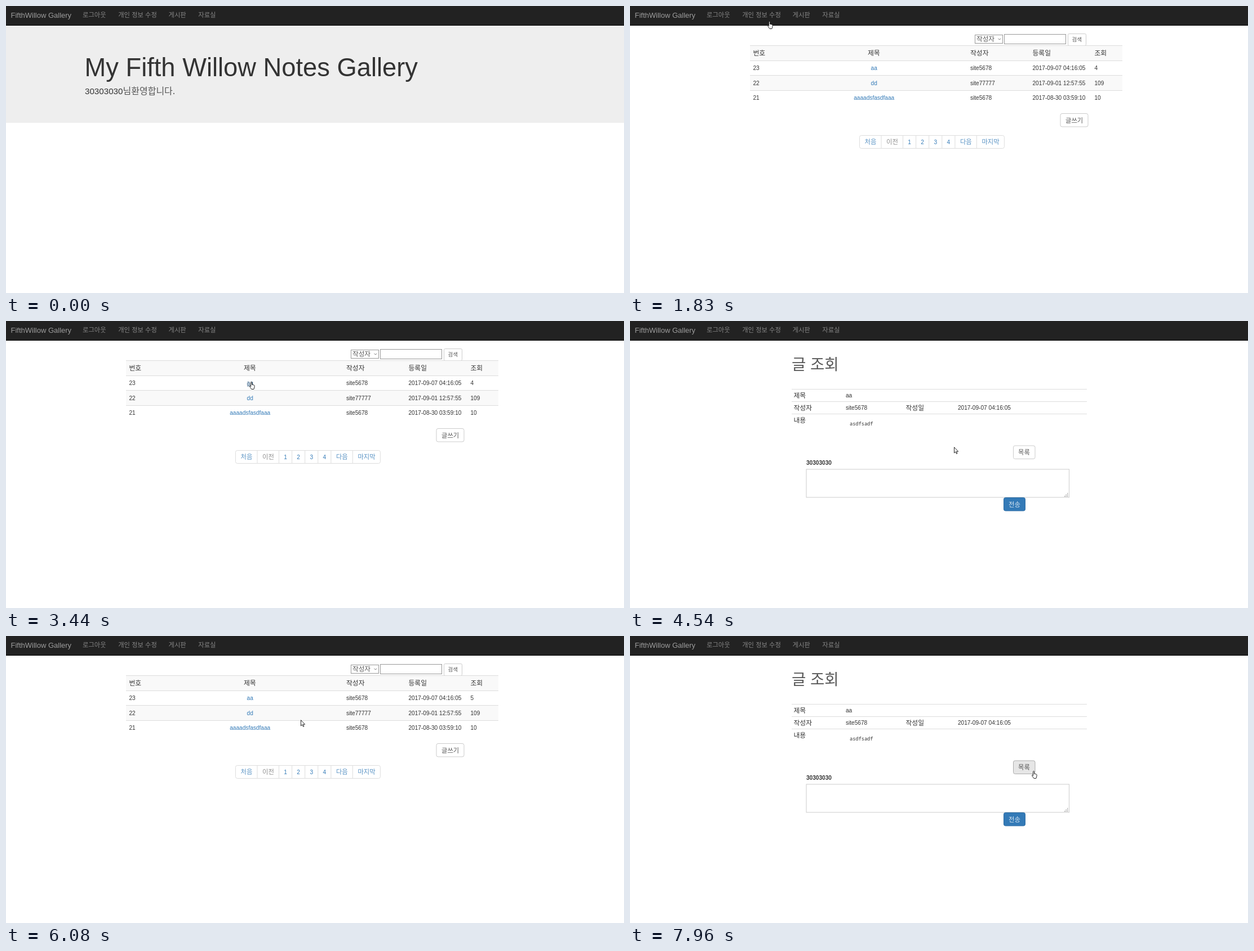
These frames come from a looping animation (1097x511 px, 8 s). An HTML page:

```html
<!DOCTYPE html>
<html lang="ko">
<head>
<meta charset="utf-8">
<style>
html, body { margin: 0; width: 100%; height: 100%; overflow: hidden; background: #fff; }
svg { display: block; width: 100%; height: 100%; }
text { font-family: "Liberation Sans", Arial, sans-serif; white-space: pre; }
.ko { font-family: "Noto Sans CJK KR", "Noto Sans CJK", sans-serif; font-weight: 300; fill-opacity: .82; }
.th { font-weight: 400; fill-opacity: 1; }
.mono { font-family: "Noto Sans Mono", monospace; }
.bold { font-weight: 700; }
</style>
</head>
<body>
<svg id="stage" viewBox="0 0 1097 511"></svg>
<script>
const LOOP = 8000, STEP = 77, LINK = '#337ab7', INK = '#333';
const BODY = 10.12, KO = 11.3, HEAD = 11.8;
const stage = document.getElementById('stage');
const $ = id => document.getElementById(id);

// y is the vertical middle of the glyphs
const text = (x, y, s, size = BODY, fill = INK, cls = '', extra = '') =>
  `<text x="${x}" y="${(y + size * .365).toFixed(2)}" font-size="${size}" fill="${fill}" class="${cls}" ${extra}>${s}</text>`;
const mid = (x, y, s, fill) => text(x, y, s, BODY, fill, '', 'text-anchor="middle"');
const ko = (x, y, s, size = KO, fill = INK, cls = '') => text(x, y, s, size, fill, 'ko ' + cls);
const head = (x, y, s) => ko(x, y, s, HEAD, INK, 'th');
const rect = (x, y, w, h, fill, stroke = 'none', r = 0, extra = '') =>
  `<rect x="${x}" y="${y}" width="${w}" height="${h}" fill="${fill}" stroke="${stroke}" rx="${r}" ${extra}/>`;
const line = (x1, y1, x2, y2) => `<path d="M${x1} ${y1}L${x2} ${y2}" stroke="#ddd"/>`;
const group = (id, body) => `<g id="${id}">${body}</g>`;

function navBar() {
  const items = { out: '로그아웃', info: '개인 정보 수정', list: '게시판', files: '자료실' };
  let x = 136, out = rect(0, 0, 1097, 35, '#222') + rect(0, 34, 1097, 1, '#080808') +
    text(8.5, 16, 'FifthWillow Gallery', 13, '#9d9d9d');
  for (const [id, s] of Object.entries(items)) {
    out += group(id, ko(x, 16, s, KO, 'currentColor'));
    const spaces = s.split(' ').length - 1;
    x += (s.length - spaces) * 10.45 + spaces * 2.6 + 21.4;
  }
  return out;
}

function homePage() {
  return rect(0, 35, 1097, 173, '#eee') +
    text(139.5, 108.5, 'My Fifth Willow Notes Gallery', 45.3) +
    text(140, 151, '30303030', 15.17) + ko(207.5, 151, '님환영합니다.', 16);
}

function pager() {
  const y = 230.5, h = 23;
  let x = 407.5, out = '';
  for (const s of ['처음', '이전', '1', '2', '3', '4', '다음', '마지막']) {
    const isNum = s < 'A', w = isNum ? 23.1 : 17.5 + s.length * 10.5;
    const fill = s === '이전' ? '#777' : LINK;
    if (out) out += line(x, y, x, y + h);
    out += isNum ? mid(x + w / 2, 242, s, fill) : ko(x + 9, 242, s, KO, fill);
    x += w;
  }
  return rect(407.5, y, x - 407.5, h, '#fff', '#ddd', 3) + out;
}

function boardPage() {
  const cols = [[218.5, '번호'], [422, '제목'], [604, '작성자'], [714.5, '등록일'], [824.5, '조회']];
  const rows = [
    ['23', 'aa', 'site5678', '2017-09-07 04:16:05', '4'],
    ['22', 'dd', 'site77777', '2017-09-01 12:57:55', '109'],
    ['21', 'aaaadsfasdfaaa', 'site5678', '2017-08-30 03:59:10', '10']
  ];
  let out = rect(612.5, 51.5, 49, 15, '#fff', '#999') + ko(615, 59, '작성자', 11.6) +
    '<path d="M653.5 57.8l2.3 2.3 2.3-2.3" fill="none" stroke="#777"/>' +
    rect(664.5, 50.5, 109, 17, '#fff', '#999') +
    rect(777.5, 49.5, 32, 21, '#fff', '#ccc', 2) + ko(784.5, 59.5, '검색', 9.5);
  for (let i = 0; i < 4; i++) {
    const y = Math.floor(70.6 + i * 26.5) + .5;
    if (i % 2 === 0) out += rect(213, y, 661, 26.5, '#f9f9f9');
    out += line(213, y, 874, y);
  }
  out += cols.map(([x, s]) => head(x, 84, s)).join('');
  rows.forEach((row, r) => row.forEach((s, c) => {
    const y = 110.7 + r * 26.4, first = r === 0;
    if (c !== 1) out += text(cols[c][0], y, s, BODY, INK, '', first && c === 4 ? 'id="views"' : '');
    else if (first) out += group('post', mid(433.2, y, s, 'currentColor') +
      '<path id="under" d="M428 115.5h11" stroke="currentColor"/>');
    else out += mid(433.2, y, s, LINK);
  }));
  return out + rect(764, 191.5, 49, 23.5, '#fff', '#ccc', 3) + ko(773, 203.5, '글쓰기') + pager();
}

function postPage() {
  const left = 290.5, value = 383, y = i => 132.5 + i * 22;
  let out = ko(287, 77, '글 조회', 27.5);
  for (let i = 0; i < 3; i++) out += line(287, y(i) - 11, 811, y(i) - 11) + head(left, y(i), ['제목', '작성자', '내용'][i]);
  out += text(value, y(0), 'aa') + text(value, y(1), 'site5678') +
    head(489.5, y(1), '작성일') + text(582, y(1), '2017-09-07 04:16:05') +
    text(390, 183, 'asdfsadf', 8.65, INK, 'mono') +
    rect(680.5, 222, 38.5, 23.5, '#fff', '#ccc', 3, 'id="back"') + ko(689, 233.8, '목록') +
    text(313, 252.7, '30303030', BODY, INK, 'bold') +
    rect(313, 264, 466.5, 50, '#fff', '#ccc');
  for (let r = 0; r < 3; r++) for (let c = 2 - r; c < 3; c++)
    out += rect(771 + c * 2.5, 306.5 + r * 2.5, 1.3, 1.3, '#888');
  return out + rect(663.5, 314.5, 38, 23.5, LINK, '#2e6da4', 3) + ko(672, 326.5, '전송', KO, '#fff');
}

const outline = 'fill="#fff" stroke="#111" stroke-width=".9"';
const arrow = `<path d="M.5 .7V11l2.4-2.2 1.6 3.7 1.5-.7-1.6-3.5h3.2z" ${outline}/>`;
const hand = `<path d="M2.6 8.6V1.7q0-1.2 1-1.2t1 1.2v3.5l3.2.7q1.5.4 1.4 1.9l-.5 3.2-.9 2.5H3.9L.7 8.9Q.2 7.7 1.2 7.4q.8 0 1.4 1.2z" ${outline}/>`;

stage.innerHTML = navBar() + group('home', homePage()) + group('board', boardPage()) + group('view', postPage()) +
  group('cursor', group('arrow', arrow) + group('hand', hand));

// Each move bends from the last place through its control points to a new place.
const ENTRY = [980, 372];
const moves = [
  { from: 190, to: 730, path: [[244, 19]] },
  { from: 1110, to: 1200, path: [[293, 19]] },
  { from: 1830, to: 2510, path: [[79, -28], [400, 730], [460, 112]] },
  { from: 2660, to: 3120, path: [[444, 110]] },
  { from: 3350, to: 3440, path: [[432, 108]] },
  { from: 4370, to: 5150, path: [[600, 250], [830, 425], [702, 239]] },
  { from: 5230, to: 5390, path: [[686, 228]] },
  { from: 5700, to: 6310, path: [[441, 109]] },
  { from: 6390, to: 6560, path: [[433, 107]] },
  { from: 7030, to: 7810, path: [[850, 314], [760, 300], [725, 248]] },
  { from: 7880, to: 7960, path: [[713, 240]] }
];

const lerp = (a, b, u) => a.map((v, k) => v + (b[k] - v) * u);
function bezier(pts, u) {
  while (pts.length > 1) pts = pts.slice(1).map((p, i) => lerp(pts[i], p, u));
  return pts[0];
}

function cursorAt(t) {
  const i = moves.findLastIndex(m => m.from <= t);
  if (i < 0) return null;
  const { from, to, path } = moves[i];
  const begin = i ? moves[i - 1].path.at(-1) : ENTRY;
  const steps = Math.round((to - from) / STEP) + 1;
  const step = Math.floor((t - from) / STEP + .25) + 1;
  return bezier([begin, ...path], Math.min(1, step / steps));
}

const during = (t, ...spans) => spans.some(([a, b]) => t >= a && t < b);
const show = (id, on) => $(id).setAttribute('display', on ? 'inline' : 'none');

function draw(t) {
  const home = t < 1830, board = during(t, [1830, 4220], [5700, 7180]);
  show('home', home);
  show('board', board);
  show('view', !home && !board);
  $('views').textContent = t < 5000 ? '4' : '5';

  const lit = during(t, [730, 1200]) ? 'info' : during(t, [1200, 1830]) ? 'list' : '';
  for (const id of ['out', 'info', 'list', 'files']) $(id).setAttribute('color', id === lit ? '#fff' : '#9d9d9d');

  const onPost = during(t, [3350, 4220], [6390, 7180]);
  $('post').setAttribute('color', onPost ? '#23527c' : LINK);
  show('under', onPost);

  const pressed = during(t, [5390, 5560]), over = during(t, [5230, 5700], [7960, LOOP]);
  $('back').setAttribute('fill', pressed ? '#d4d4d4' : over ? '#e6e6e6' : '#fff');
  $('back').setAttribute('stroke', pressed ? '#8c8c8c' : over ? '#adadad' : '#ccc');

  const pos = cursorAt(t);
  show('cursor', pos);
  if (pos) $('cursor').setAttribute('transform', `translate(${pos.map(Math.round)})`);
  // the hand lingers briefly after a page change and turns to an arrow while one loads
  const pointing = during(t, [730, 1900], [3350, 4370], [5230, 5560], [6390, 7180], [7960, LOOP]);
  show('hand', pointing);
  show('arrow', !pointing);
}

const start = performance.now();
function tick() {
  draw((performance.now() - start) % LOOP);
  requestAnimationFrame(tick);
}
tick();
</script>
</body>
</html>
```
